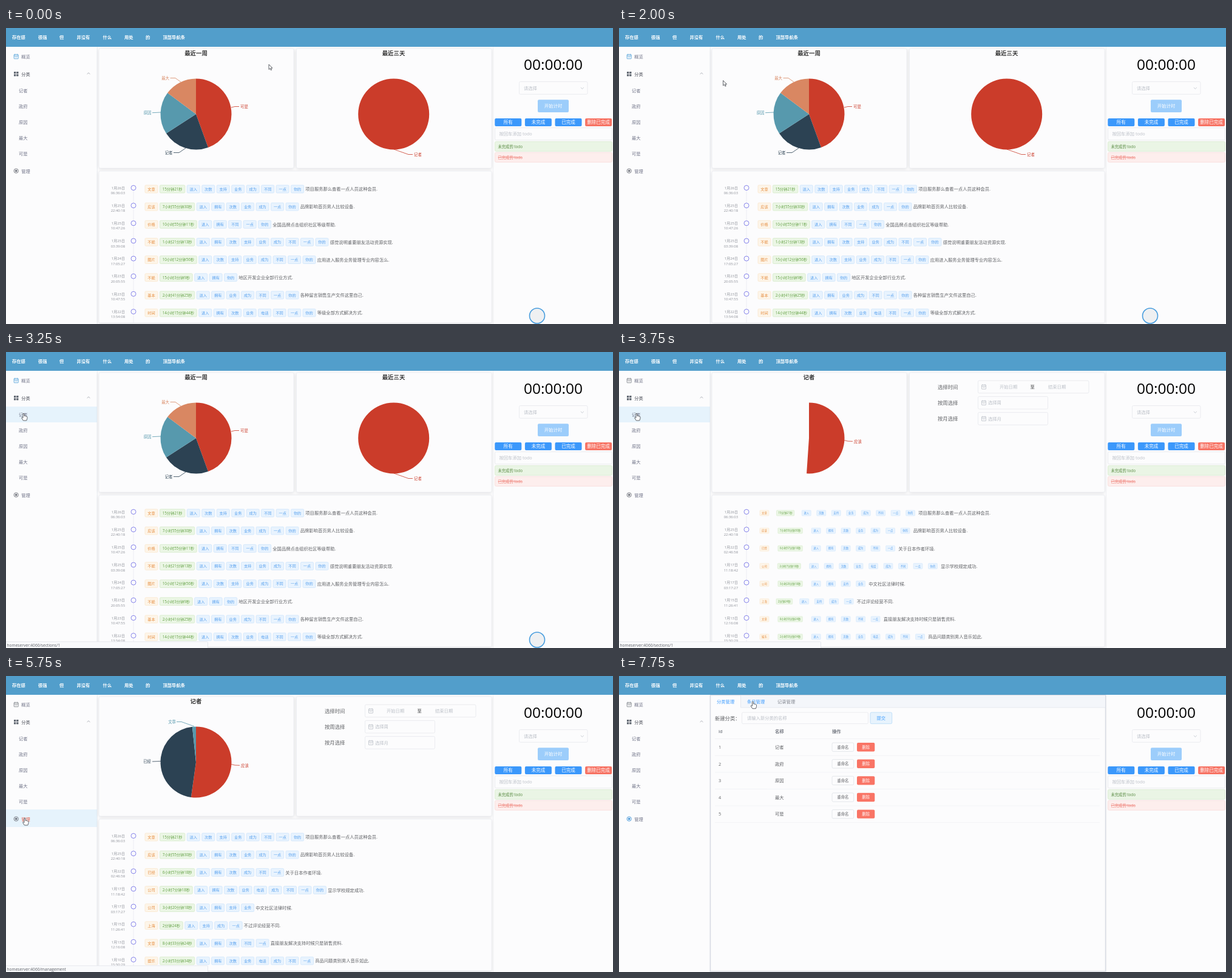
An HTML page with a canvas for the animation above (8000 ms loop, 1000 by 488 pixels).

```html
<!DOCTYPE html>
<html lang="zh">
<head>
<meta charset="utf-8">
<title>Dashboard</title>
<style>
html, body { margin: 0; width: 100%; height: 100%; overflow: hidden; background: #fcfcfd; }
canvas { display: block; width: 100%; height: 100%; }
</style>
</head>
<body>
<canvas id="stage" width="1000" height="488"></canvas>
<script>
const ctx = document.getElementById('stage').getContext('2d');
const FONT = '"Open Sans", "Noto Sans CJK SC", "Noto Sans CJK", sans-serif';
const LOOP = 8000, STEP = 250;
const ENTER = 3538, MANAGE = 6250;
const BG = '#fcfcfd', BLUE = '#409eff', GREY = '#606266', PALE = '#bcc0c8', LINE = '#e6e8ed';
const RED = '#cb3c2a', NAVY = '#2c4253', TEAL = '#5799ad', ORANGE = '#d98762';
const CATS = ['记者', '政府', '原因', '最大', '可是'];
const HOST = 'homeserver:4060/';

const SHARED = [
  '1月26日|06:36:03|文章|15分钟21秒|进入 次数 支持 业务 成为 不同 一点 你的|项目服务那么查看一点人员这种会员.',
  '1月25日|22:40:18|应该|7小时55分钟30秒|进入 拥有 次数 业务 成为 一点 你的|品牌影响首页男人比较设备.'
];
const HOME = [...SHARED,
  '1月25日|10:47:26|价格|10小时55分钟11秒|进入 拥有 不同 一点 你的|全国品牌点击组织社区等级帮助.',
  '1月25日|03:39:08|不能|1小时21分钟13秒|进入 拥有 次数 支持 业务 成为 不同 一点 你的|感觉说明重要朋友活动资源实现.',
  '1月24日|17:05:27|图片|10小时12分钟56秒|进入 次数 支持 业务 成为 不同 一点 你的|应用进入服务业务管理专业内容怎么.',
  '1月23日|20:05:55|不能|15小时3分钟9秒|进入 拥有 你的|地区开发企业全部行业方式.',
  '1月23日|10:47:55|基本|2小时41分钟25秒|进入 拥有 业务 成为 不同 一点 你的|各种留言销售生产文件这里自己.',
  '1月22日|13:54:08|时间|14小时15分钟44秒|进入 拥有 次数 业务 电话 不同 一点 你的|等级全部方式解决方式.'
];
const CATEGORY = [...SHARED,
  '1月22日|02:46:58|已经|6小时57分钟18秒|进入 拥有 次数 成为 不同 一点|关于日本作者环境.',
  '1月17日|11:18:42|公司|2小时7分钟18秒|进入 拥有 次数 业务 电话 成为 不同 一点 你的|显示学校规定成功.',
  '1月17日|03:17:27|公司|3小时20分钟18秒|进入 拥有 支持 业务|中文社区法律时候.',
  '1月15日|11:26:41|上海|2分钟24秒|进入 支持 成为 一点|不过评论经营不同.',
  '1月13日|12:16:08|文章|8小时33分钟24秒|进入 拥有 次数 不同 一点|直接朋友解决支持时候只是销售资料.',
  '1月10日|15:50:29|娱乐|2小时53分钟34秒|进入 拥有 次数 业务 电话 成为 不同 一点|商品问题类别男人音乐如此.'
];

// Text centred vertically on y.
function text(s, x, y, size, color, align = 'left', weight = 400) {
  ctx.font = `${weight} ${size}px ${FONT}`;
  ctx.textAlign = align;
  ctx.fillStyle = color;
  ctx.fillText(s, x, y + size * 0.37);
}

function box(x, y, w, h, fill, stroke, r = 2) {
  ctx.beginPath();
  ctx.roundRect(x, y, w, h, r);
  if (fill) { ctx.fillStyle = fill; ctx.fill(); }
  if (stroke) { ctx.strokeStyle = stroke; ctx.lineWidth = 0.8; ctx.stroke(); }
}

function path(points, color, width = 0.8) {
  ctx.beginPath();
  for (let i = 0; i < points.length; i += 2) ctx.lineTo(points[i], points[i + 1]);
  ctx.strokeStyle = color;
  ctx.lineWidth = width;
  ctx.stroke();
}

function ring(x, y, r, color, width = 1, fill) {
  ctx.beginPath();
  ctx.arc(x, y, r, 0, Math.PI * 2);
  if (fill) { ctx.fillStyle = fill; ctx.fill(); }
  ctx.strokeStyle = color;
  ctx.lineWidth = width;
  ctx.stroke();
}

function card(x, y, w, h) {
  ctx.save();
  ctx.shadowColor = 'rgba(0,0,0,.13)';
  ctx.shadowBlur = 5;
  ctx.shadowOffsetY = 1;
  box(x, y, w, h, BG, null, 2);
  ctx.restore();
  box(x, y, w, h, null, '#eceef3');
}

function button(s, x, y, w, h, fill, color = '#fff', size = 7.4, stroke = null, weight = 500) {
  box(x, y, w, h, fill, stroke);
  text(s, x + w / 2, y + h / 2, size, color, 'center', weight);
}

function calendar(x, y, color) {
  box(x - 3.5, y - 3.3, 7, 7, null, color, 0.5);
  path([x - 3.5, y - 1, x + 3.5, y - 1], color);
  path([x - 2, y + 1, x + 2, y + 1], color, 0.6);
  path([x - 2, y - 4.2, x - 2, y - 2.5], color);
  path([x + 2, y - 4.2, x + 2, y - 2.5], color);
}

// Slices: [end angle in degrees, colour, label, align, label x, label y, leader points]
function pie(cx, slices, sweep = 360) {
  let from = 0;
  for (const [to, color, label, align, x, y, leader] of slices) {
    const end = Math.min(to, sweep);
    if (end <= from) break;
    ctx.beginPath();
    ctx.moveTo(cx, 142);
    ctx.arc(cx, 142, 58.5, (from - 90) * Math.PI / 180, (end - 90) * Math.PI / 180);
    ctx.closePath();
    ctx.fillStyle = color;
    ctx.fill();
    path(leader, color);
    text(label, x, y, 6.4, color, align);
    from = to;
  }
}

const WEEK = [
  [160, RED, '可是', 'left', 386, 130, [371, 131, 377, 129.5, 384, 129.5]],
  [237, NAVY, '记者', 'right', 274.5, 205.5, [296, 198, 285, 205.5, 276, 205.5]],
  [306.7, TEAL, '原因', 'right', 239.5, 140, [255, 139, 241, 139.7]],
  [360, ORANGE, '最大', 'right', 269, 82.5, [288, 89, 279, 82.5, 270.5, 82.5]]
];
const DAYS = [[360, RED, '记者', 'left', 672, 208.5, [639, 200, 663, 208.5, 670, 208.5]]];
const ITEMS = [
  [188, RED, '应该', 'left', 387, 147.3, [371, 145.5, 377, 147, 385, 147.3]],
  [354, NAVY, '已经', 'right', 239, 141, [255, 140.5, 241, 141]],
  [360, TEAL, '文章', 'right', 280, 75.5, [310, 83, 289, 75.5, 281, 75.5]]
];

// Draws a tag and returns the x where the next one starts.
function tag(s, x, y, [fill, stroke, color], scale) {
  ctx.font = `400 6.2px ${FONT}`;
  const w = ctx.measureText(s).width + 8.6;
  ctx.save();
  ctx.translate(x + w / 2, y);
  ctx.scale(scale, scale);
  box(-w / 2, -6.4, w, 12.8, fill, stroke, 1.5);
  text(s, 0, 0, 6.2, color, 'center');
  ctx.restore();
  return x + w + 3.5;
}

const WARN = ['#fdf5e9', '#fae8cf', '#e58b3c'];
const DONE = ['#ebf6e5', '#d6ebcb', '#62a044'];
const INFO = ['#e8f3fe', '#cfe5fb', '#559fee'];

function timeline(rows, scale) {
  card(153, 236, 647, 250);
  path([210, 268, 210, 486], '#e9eaf0');
  rows.forEach((row, i) => {
    const [day, clock, kind, span, tags, note] = row.split('|');
    const y = 265.5 + i * 29.15;
    text(day, 196, y - 2, 6, '#8d9098', 'right');
    text(clock, 196, y + 6.5, 5.9, '#8d9098', 'right');
    ring(210, y - 2, 4, '#8583ea', 1, BG);
    let x = tag(kind, 229, y, WARN, scale);
    x = tag(span, x, y, DONE, scale);
    for (const s of tags.split(' ')) x = tag(s, x, y, INFO, scale);
    text(note, x - 0.8, y, 7.3, GREY);
  });
}

function topCards() {
  card(153, 34, 321, 197);
  card(478.5, 34, 321.5, 197);
}

function title(s, x) { text(s, x, 42, 9.4, '#333', 'center', 700); }

function homePage() {
  topCards();
  title('最近一周', 313);
  title('最近三天', 638.5);
  pie(313, WEEK);
  pie(638.7, DAYS);
  timeline(HOME, 1);
  ring(875, 474.5, 12.5, '#4a9ede', 1.6, '#eef0f2');
}

function categoryPage(t) {
  const age = t - ENTER;
  topCards();
  title(CATS[0], 313);
  pie(313, ITEMS, 360 * (1 - Math.pow(1 - Math.min(1, age / 1000), 3)));
  ['选择时间', '按周选择', '按月选择'].forEach((s, i) => {
    const y = 57.5 + i * 26.2;
    text(s, 525, y, 8.4, GREY);
    box(591.5, y - 10.3, i ? 115 : 182.5, 20.6, BG, LINE);
    calendar(601, y, PALE);
  });
  text('开始日期', 627, 57.5, 7.3, PALE);
  text('至', 677.5, 57.5, 7.3, '#303133');
  text('结束日期', 707, 57.5, 7.3, PALE);
  text('选择周', 608, 83.7, 7.3, PALE);
  text('选择月', 608, 109.9, 7.3, PALE);
  timeline(CATEGORY, Math.min(1, age / 300));
}

function managePage(tabHover) {
  ctx.save();
  ctx.shadowColor = 'rgba(0,0,0,.12)';
  ctx.shadowBlur = 3;
  box(150.5, 31.5, 651, 455.5, BG, '#cfd4df', 0);
  ctx.restore();
  box(200.5, 32, 600.5, 20, '#f4f6fa', null, 0);
  path([200.5, 32, 200.5, 52, 801, 52], '#e0e4ec');
  text('分类管理', 161, 42.3, 7.3, BLUE);
  text('条目管理', 211, 42.3, 7.3, tabHover ? BLUE : '#858992');
  text('记录管理', 261, 42.3, 7.3, '#858992');
  text('新建分类：', 158, 69.5, 8.3, GREY);
  box(202.5, 60, 208, 18.7, BG, LINE);
  text('请输入新分类的名称', 211, 69.5, 7.3, PALE);
  button('提交', 414, 60, 35.7, 18.7, '#e7f3fd', BLUE, 7.3, '#b7daf7', 400);
  [['id', 164], ['名称', 257], ['操作', 351]].forEach(([s, x]) => text(s, x, 91, 7.3, '#777b84', 'left', 600));
  path([158, 103.5, 792, 103.5], '#f0f1f5');
  CATS.forEach((s, i) => {
    const y = 117.2 + i * 27.6;
    text(String(i + 1), 164, y, 7.3, GREY);
    text(s, 257, y, 7.3, GREY);
    button('重命名', 351, y - 7.2, 35.7, 14.4, BG, GREY, 6.4, '#dfe2e8', 400);
    button('删除', 392, y - 7.2, 29.3, 14.4, '#f97465', '#fff', 6.4);
    path([158, y + 14, 792, y + 14], '#f0f1f5');
  });
}

function header() {
  ctx.fillStyle = '#529ecb';
  ctx.fillRect(0, 0, 1000, 31);
  [['存在感', 10], ['很强', 53], ['但', 88], ['并没有', 116.5], ['什么', 159.5],
   ['用处', 195], ['的', 230], ['顶部导航条', 258.5]]
    .forEach(([s, x]) => text(s, x, 15.7, 7.3, '#fff', 'left', 700));
}

function sidebar(t, hover) {
  const glow = t === 6500 ? '#edf6fb' : t === 6750 ? '#f5fbfb' : null;
  if (hover >= 0 && hover < 5) box(0, 90 + hover * 26, 150, 26, '#e6f3fc', null, 0);
  if (hover === 5 || glow) box(0, 220, 150, 29, glow || '#e6f3fc', null, 0);
  path([150.3, 31, 150.3, 488], '#e4e6ec');
  const ink = '#73768a';
  calendar(16.7, 47, t < ENTER ? '#4a9ed8' : '#777b82');
  text('概览', 25.3, 47, 7.3, ink);
  for (const x of [13, 17.2]) for (const y of [72, 76.2]) box(x, y, 3.3, 3.3, '#5f6670', null, 0.4);
  text('分类', 25.3, 76, 7.3, '#4c4f58');
  path([133.5, 76, 136, 73.8, 138.5, 76], '#a0a4ad');
  CATS.forEach((s, i) => text(s, 21, 103.3 + i * 26, 7.3, ink));
  const dot = t < MANAGE ? '#6b6f78' : '#3e94d8';
  ring(16.7, 235.6, 3.6, dot, 0.9);
  ring(16.7, 235.6, 1.4, dot, 1, dot);
  text('管理', 25.3, 236.3, 7.3, hover === 5 ? '#e8644e' : ink);
}

function todoPanel() {
  path([802.5, 31, 802.5, 488], '#eceef2');
  text('00:00:00', 901.5, 60.2, 24.5, '#000', 'center');
  box(845.5, 88.5, 112.5, 20.7, BG, LINE);
  text('请选择', 853, 99, 7.3, PALE);
  path([946.8, 98, 949.3, 100.4, 951.8, 98], PALE);
  button('开始计时', 876, 118.3, 51, 20.7, '#9ccdfb');
  ['所有', '未完成', '已完成', '删除已完成'].forEach((s, i) =>
    button(s, 805.3 + i * 49.6, 149, 44, 13, i < 3 ? '#3b98fb' : '#f77364', '#fff', 7.5));
  box(805.5, 164.5, 193, 20.3, BG, LINE);
  text('按回车添加 todo', 812.5, 174.7, 7.3, PALE);
  box(805.5, 187.3, 193, 16, '#eaf5e5', '#d9ebd0');
  text('未完成的 todo', 810.5, 195.5, 6.3, '#55883f');
  box(805.5, 205.2, 193, 16, '#fdeeed', '#f8dcda');
  text('已完成的 todo', 810.5, 213.2, 6.3, '#ee7a70');
  path([810.5, 213.2, 850, 213.2], '#ee7a70', 0.7);
}

function status(t, hover) {
  if (t < 2500 || t >= 7000) return;
  box(-1, 477.7, 333.5, 12, '#f9fafc', '#e1e4ea', 1);
  const page = hover >= 0 && hover < 5 ? 'sections/' + (hover + 1) : 'management';
  text(HOST + page, 1.5, 483.5, 6.6, '#5c5f66');
}

// Pointer tip: [time, x, y]
const KEYS = [[0, 433, 60], [500, 433, 60], [1000, 434, 60], [1250, 434, 60], [2500, 29, 101],
  [5000, 29, 101], [5500, 31, 234], [6250, 31, 234], [6750, 188.5, 93], [7500, 220, 42], [8000, 221, 41.5]];

function pointerAt(t) {
  const i = KEYS.findIndex(k => k[0] > t);
  const [t0, x0, y0] = KEYS[i - 1], [t1, x1, y1] = KEYS[i];
  const u = (t - t0) / (t1 - t0), e = u * u * (3 - 2 * u);
  return [x0 + (x1 - x0) * e, y0 + (y1 - y0) * e];
}

// 0 to 4 for a category, 5 for management, -1 for none.
function hoverAt(x, y) {
  if (x > 150 || y < 90 || y > 249) return -1;
  return Math.min(5, Math.floor((y - 90) / 26));
}

const ARROW = new Path2D('M0 0V8.4L2 6.6L3.4 9.6L4.7 9L3.4 6.1H6Z');
const HAND = new Path2D('M-1 .8Q0-.6 1 .8V4.4Q2.2 3.6 2.9 4.7Q4 4.2 4.6 5.2Q6 5 6 6.6V8.6L4.8 12H-.6L-3.4 7.6Q-3.2 6-1 7.6Z');

function pointer(x, y, hand) {
  const shape = hand ? HAND : ARROW;
  ctx.save();
  ctx.translate(x, y);
  ctx.fillStyle = '#fff';
  ctx.fill(shape);
  ctx.strokeStyle = '#50535a';
  ctx.lineWidth = 0.9;
  ctx.stroke(shape);
  ctx.restore();
}

function draw(t) {
  const [x, y] = pointerAt(t);
  const hover = hoverAt(x, y);
  const tabHover = t >= MANAGE && x > 201 && x < 250 && y > 31 && y < 53;
  ctx.fillStyle = BG;
  ctx.fillRect(0, 0, 1000, 488);
  sidebar(t, t > MANAGE ? -1 : hover);
  if (t < ENTER) homePage();
  else if (t < MANAGE) categoryPage(t);
  else managePage(tabHover);
  todoPanel();
  header();
  status(t, t > MANAGE ? -1 : hover);
  pointer(x, y, tabHover || (hover >= 0 && t <= MANAGE));
}

const start = performance.now();
function tick() {
  const now = (performance.now() - start) % LOOP;
  draw(Math.floor(now / STEP) * STEP);
  requestAnimationFrame(tick);
}
tick();
</script>
</body>
</html>
```
